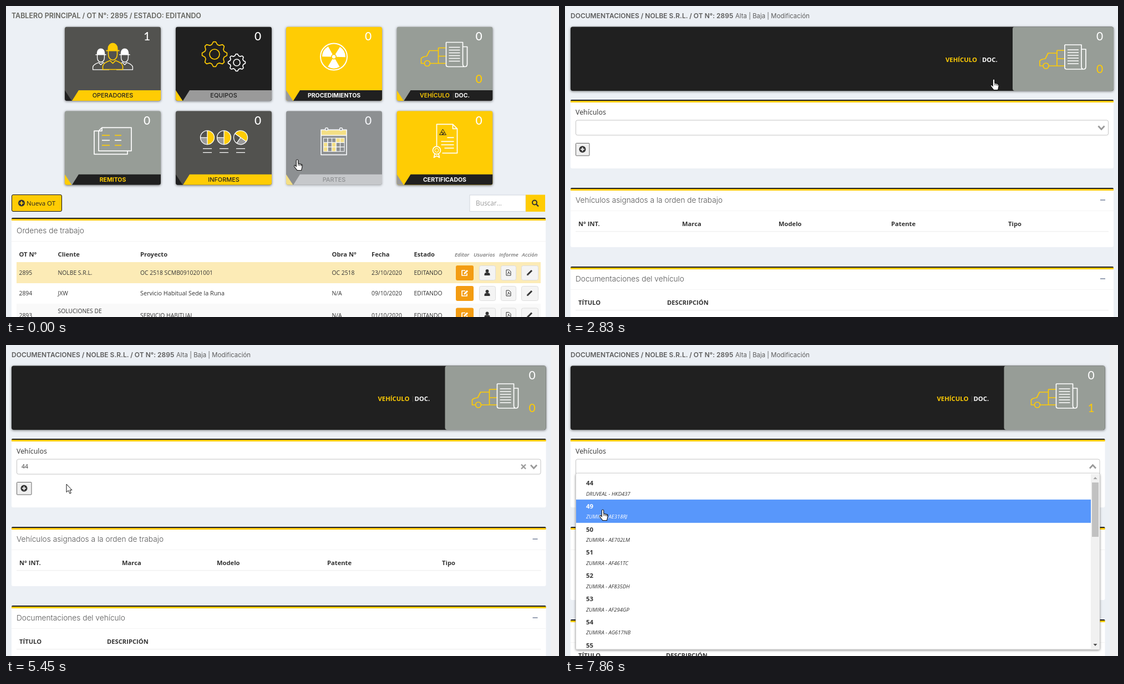
Animation of 997x561 px, one loop 7.99 s. Source, as an HTML page:

```html
<!DOCTYPE html>
<html lang="es">
<head>
<meta charset="utf-8">
<title>Tablero de órdenes</title>
<style>
  html, body { margin: 0; width: 100%; height: 100%; overflow: hidden; background: #ecf0f5; }
  svg { display: block; width: 997px; height: 561px; cursor: none; }
  text { font-family: "Open Sans", "Noto Sans", sans-serif; white-space: pre; }
  .head { font-family: Inter, sans-serif; }
  .count { font-family: Lato, sans-serif; text-anchor: middle; }
  .b { font-weight: 700; }
  .s { font-weight: 600; }
  .m { font-weight: 500; }
  .l { font-weight: 300; }
  .i { font-style: italic; }
  .c { text-anchor: middle; }
  .shadow { filter: drop-shadow(0 1px 2px #0008); }
  .line { fill: none; stroke-width: 1.7; stroke-linejoin: round; }
</style>
</head>
<body>
<svg viewBox="0 0 997 561">
  <defs><clipPath id="round"><rect width="173" height="133.5" rx="4"/></clipPath></defs>
  <g id="page"></g>
  <g id="select"></g>
  <g id="list"></g>
  <g id="cursor"></g>
</svg>
<script>
const LOOP = 7990;
const Y = '#ffcc04', K = '#202020', D = '#52524f', G = '#979d97', S = '#9a9a9a', W = '#fff', INK = '#333';
const $ = id => document.getElementById(id);

const rect = (x, y, w, h, fill, more = '') => `<rect x="${x}" y="${y}" width="${w}" height="${h}" fill="${fill}" ${more}/>`;
const text = (x, y, str, size, fill = INK, cls = '') => `<text x="${x}" y="${y}" font-size="${size}" fill="${fill}" class="${cls}">${str}</text>`;
const line = (d, stroke, more = '') => `<path class="line" d="${d}" stroke="${stroke}" ${more}/>`;
const fill = (d, color) => `<path d="${d}" fill="${color}"/>`;
const disc = (x, y, r, color, more = '') => `<circle cx="${x}" cy="${y}" r="${r}" fill="${color}" ${more}/>`;
const at = (x, y, body, more = '') => `<g transform="translate(${x} ${y}) ${more}">${body}</g>`;
const range = (n, f) => Array.from({ length: n }, (_, i) => f(i)).join('');

// ---- icons, placed relative to their tile ----
function person(x, y, scale, color) {
  const hollow = `style="fill:${D}"`;
  return at(x, y, line('M-18 48V42Q-17 36 -5 32L0 37L5 32Q17 36 18 42V48Z', color, hollow) +
    line('M-8 13V21A8 10 0 0 0 8 21V13', color, hollow) +
    fill('M-12 15V13H-9V10A9 10 0 0 1 9 10V13H12V15Z', color), `scale(${scale})`);
}
function gear(x, y, r, hole, color) {
  const pts = range(32, i => {
    const a = (i - .5) * Math.PI / 16, q = i % 4 < 2 ? r : r * .8;
    return `${i ? 'L' : 'M'}${(q * Math.cos(a)).toFixed(1)} ${(q * Math.sin(a)).toFixed(1)}`;
  });
  return at(x, y, line(pts + 'Z', color) + disc(0, 0, hole, 'none', `stroke="${color}" stroke-width="1.7"`));
}
function trefoil(x, y, scale, color) {
  return at(x, y, `<circle r="13" fill="none" stroke="${color}" stroke-width="16" stroke-dasharray="13.614" transform="rotate(60)"/>` +
    disc(0, 0, 3.2, color), `scale(${scale})`);
}
function pie(x, turn) {
  return at(x, 48, fill('M0 -12.5A12.5 12.5 0 0 1 0 12.5Z', Y) + fill('M0 0H-12.5A12.5 12.5 0 0 0 0 12.5Z', S) +
    line('M0 -12.5V12.5M0 0H-12.5', W, 'style="stroke-width:1.3"') +
    disc(0, 0, 12.5, 'none', `stroke="${W}" stroke-width="1.3"`), `rotate(${turn})`) +
    line(`M${x - 8} 68h16m-16 7h16`, W, 'style="stroke-width:1.2"');
}
const icons = {
  crew: person(65, 39, .8, W) + person(108, 39, .8, W) + person(86.5, 29, 1, Y),
  gears: gear(70, 49.5, 22.5, 9, Y) + gear(110, 64.5, 15.5, 6, W),
  atom: disc(86, 54, 24, 'none', `stroke="${W}" stroke-width="2"`) + trefoil(86, 54, 1, W),
  truck: line('M50 66H44V57Q46 54 54 53L59 43H75V66H60M75 38H89M75 53H89M75 66H89M75 38V45', Y) +
    disc(55, 66, 5, G, `stroke="${Y}" stroke-width="1.7"`) +
    line('M89 28H119V67Q119 72 123 72Q127 72 127 67V36H119M89 28V69Q89 72 93 72H123', W, `style="fill:${G}"`) +
    line(range(6, i => `M94 ${37 + 5 * i}h20`), W),
  sheets: line('M61 36H53V78H113V72M67 30H120V72H61V36ZM67 30V36H61', W) +
    range(3, i => line(`M67 ${44 + 9 * i}h14`, i % 2 ? W : Y) + line(`M90 ${44 + 9 * i}h12`, i % 2 ? W : Y)),
  pies: pie(57, 0) + pie(87, 0) + pie(117, -55),
  calendar: rect(63, 34, 46, 10, Y) + line('M63 34H109V79H63ZM63 44H109', W) +
    [73, 99].map(x => disc(x, 33, 2.5, K, `stroke="${W}" stroke-width="1.5"`)).join('') +
    range(15, i => rect(67.5 + i % 5 * 7.5, 49 + Math.floor(i / 5) * 8, 7.5, 8, [3, 4, 5, 7, 10, 12].includes(i) ? Y : 'none', `stroke="${W}" stroke-width="1.1"`)),
  award: line('M72 66V24H101L109 32V76H82M101 24V32H109M91 48h12M80 55h23M80 61h23M86 67h17', W) +
    line('M83 33L89 43H77Z', K, 'style="stroke-width:1"') + trefoil(83, 40, .13, K) +
    line('M69 76L67 84L72 81L77 84L75 76', W) + disc(72, 71, 7, Y, `stroke="${W}" stroke-width="1.7"`) +
    disc(72, 71, 3.5, 'none', `stroke="${W}"`)
};

const plus = (x, y, color, sign = 'M-3.5 0H3.5M0 -3.5V3.5') => at(x, y, disc(0, 0, 6, INK) + line(sign, color, 'style="stroke-width:2"'));

// ---- dashboard ----
const COLS = [106, 306, 505, 704.5], ROWS = [37.5, 189.3];
const TILES = [
  [D, K, Y, K, 'OPERADORES', 'crew'], [K, Y, S, K, 'EQUIPOS', 'gears'],
  [Y, S, K, W, 'PROCEDIMIENTOS', 'atom'], [G, Y, K, Y, '', 'truck'],
  [G, Y, K, Y, 'REMITOS', 'sheets'], [D, K, Y, K, 'INFORMES', 'pies'],
  [K, Y, S, K, 'PARTES', 'calendar'], [Y, S, K, W, 'CERTIFICADOS', 'award']
];

function tile([bg, corner, bar, ink, label, icon], i) {
  const bold = bar === K;
  const caption = label
    ? text(86.5, 127.7, label, bold ? 10.5 : 10.9, ink, 'head c ' + (bold ? 'b' : 'm'))
    : text(41.5, 127.7, 'VEHÍCULO', 10.5, Y, 'head s') + text(99, 127.2, '|', 10, D) + text(104.5, 127.7, 'DOC.', 10.5, W, 'head b') + text(148, 101.5, 0, 21, Y, 'count m');
  return at(COLS[i % 4], ROWS[i >> 2], `<g id="tile${i}"><g class="shadow"><g clip-path="url(#round)">` +
    rect(0, 0, 173, 134, bg) + fill('M0 114.5L12.5 133.5H0Z', corner) + fill('M25 114.5H173V133.5H13Z', bar) + '</g></g>' +
    icons[icon] + caption + text(148, 24.5, i ? 0 : 1, 21, W, 'count m') + '</g>');
}

const panel = (y, h, r) => rect(10, y, r - 10, h, W, 'rx="3"') + rect(10, y, r - 10, 4, K, 'rx="2"') + rect(10, y + 2, r - 10, 3, Y);
const track = rect(982, 0, 15, 561, '#f0f0f1');

function actions(y) {
  const box = (x, w) => rect(x + .5, y + .5, w, 26, '#f4f4f4', 'rx="3" stroke="#ddd"');
  const cy = y + 13;
  return rect(811, y, 32, 27, '#f39c12', 'rx="3"') + box(853, 29) + box(892, 27) + box(929, 30) +
    at(827, cy, line('M1 -4H-5V5H4V1', W) + line('M-1 2L5 -4', W, 'style="stroke-width:3"')) +
    at(867.5, cy, disc(0, -3, 2.9, INK) + fill('M-5 5V3Q-5 0 -2 0H2Q5 0 5 3V5Z', INK)) +
    at(906, cy, line('M-4 -5H1L4 -2V5H-4ZM-2 3Q1 0 0 -2Q0 1 3 2', INK, 'style="stroke-width:1"')) +
    at(944, cy, line('M-3 3L4 -4', INK, 'style="stroke-width:3"') + fill('M-5 5L-4.5 1.5L-1.5 4.5Z', INK));
}

function order(y, id, client, project, work, date, top = y) {
  const cell = (x, s) => text(x, y, s, /[a-z]/.test(s) ? 10.8 : 10.35);
  return cell(23.5, id) + text(93.5, top, client, 10.35) + cell(242, project) + cell(587.5, work) + cell(659, date) + cell(735.5, 'EDITANDO') + actions(y - 17);
}

function dashboard() {
  return track + text(10, 21.5, 'TABLERO PRINCIPAL / OT N°: 2895 / ESTADO: EDITANDO', 12.45, '#62625c', 'head s') +
    TILES.map(tile).join('') +
    rect(10.5, 340.5, 90, 30, Y, 'rx="2.5" stroke="#111"') + plus(28, 355.5, Y) + text(37, 360, 'Nueva OT', 11.5, '#222') +
    rect(836, 341, 101, 29.5, W, 'stroke="#d2d6de"') + text(847, 360, 'Buscar...', 11.8, '#999') +
    rect(937, 340.5, 35, 30.5, Y) + disc(953, 354.5, 4, 'none', 'stroke="#333" stroke-width="2"') + line('M956 357.5L960 361.5', INK, 'style="stroke-width:2.4"') +
    panel(382, 200, 973) + text(19, 410, 'Ordenes de trabajo', 13.7, '#555', 'head l') + rect(10, 424, 963, 1, '#f4f4f4') +
    [[23.5, 'OT N°'], [93.5, 'Cliente'], [242, 'Proyecto'], [587.5, 'Obra N°'], [659, 'Fecha'], [735.5, 'Estado']].map(([x, s]) => text(x, 452, s, 11.2, INK, 'b')).join('') +
    [[809, 'Editar'], [843, 'Usuarios'], [889, 'Informe'], [930, 'Acción']].map(([x, s]) => text(x, 452, s, 9.6, '#777', 's i')).join('') +
    rect(19, 462, 945, 38, '#fcebb6') + rect(19, 537, 945, 30, '#f9f9f9') +
    order(485, '2895', 'NOLBE S.R.L.', 'OC 2518 SCMB0910201001', 'OC 2518', '23/10/2020') +
    order(522, '2894', 'JXW', 'Servicio Habitual Sede la Runa', 'N/A', '09/10/2020') +
    order(561.5, '2893', 'SOLUCIONES DE', 'SERVICIO HABITUAL', 'N/A', '01/10/2020', 553.5);
}

// ---- vehicle documents ----
function documents(wide, added) {
  const r = wide ? 989 : 973.5, low = added ? 495 : 470;
  const xs = wide ? [24, 211, 385, 588, 799] : added ? [24, 179, 368, 550, 725] : [24, 209, 380, 579, 786];
  const section = (y, h, title, heads) => panel(y, h, r) + text(19, y + 26.5, title, 13.7, '#555', 'head l') +
    rect(r - 24, y + 21, 9, 2, '#97a0b3') + rect(10, y + 41, r - 10, 1, '#f4f4f4') +
    heads.map(([x, s]) => text(x, y + 68.5, s, 11.2, INK, 'b')).join('') + rect(19, y + 78, r - 28, 1.5, '#f1f1f1');
  const row = added ? rect(19, 407, 945, 26, '#f9f9f9') +
    ['44', 'DRUVEAL', 'MERLUNE', 'HKD437', 'FURGON'].map((s, i) => text(xs[i], 424, s, 10.35)).join('') + plus(905, 419.5, W, 'M-3.5 0H3.5') : '';
  return (wide ? '' : track) +
    text(10, 21.5, 'DOCUMENTACIONES / NOLBE S.R.L. / OT N°: 2895', 12, '#5c5c5c', 'head s') + text(307, 21.5, 'Alta | Baja | Modificación', 11.4, '#5c5c5c', 'head') +
    `<g class="shadow">${rect(10, 37.5, r - 10, 115.5, K, 'rx="4"')}</g>` + rect(r - 182, 37.5, 182, 115.5, G, 'rx="4"') +
    text(r - 303, 100.5, 'VEHÍCULO', 11.3, Y, 'b') + text(r - 243, 100, '|', 10, D) + text(r - 237, 100.5, 'DOC.', 11.3, W, 'b') +
    at(r - 177, 42, icons.truck) + text(r - 25, 62, 0, 21, W, 'count') + text(r - 25, 121, added ? 1 : 0, 21, Y, 'count') +
    panel(169, 124, r) + text(19, 195.5, 'Vehículos', 12.4, INK, 'm') +
    rect(19.5, 247.5, wide ? 24.5 : 26.5, 22.5, '#efefef', 'stroke="#666" rx="1"') + plus(wide ? 31.5 : 32.5, 258.5, '#efefef') +
    section(328, added ? 132 : 107, 'Vehículos asignados a la orden de trabajo', ['N° INT.', 'Marca', 'Modelo', 'Patente', 'Tipo'].map((s, i) => [xs[i], s])) + row +
    section(low, 150, 'Documentaciones del vehículo', [[24, 'TÍTULO'], [wide ? 184 : 182, 'DESCRIPCIÓN']]);
}

function selectBox(wide, picked, caret, turn) {
  const r = wide ? 989 : 973.5;
  return rect(19.5, 206, r - 29, 27, W, 'rx="3" stroke="#c4c4c4"') +
    (picked ? text(28, 223, '44', 10.35) + at(r - 40.5, 219.5, line('M-4 -4L4 4M4 -4L-4 4', S, 'style="stroke-width:2.4"')) : '') +
    (caret ? rect(28, 211, 1.2, 17, '#222') : '') +
    at(r - 22, 219.5, line('M-5.5 -3L0 3L5.5 -3', S, 'style="stroke-width:2.8;stroke-linejoin:miter"'), `rotate(${turn})`);
}

const CARS = ['DRUVEAL - HKD437', 'ZUMIRA - AE318RJ', 'ZUMIRA - AE702LM', 'ZUMIRA - AF461TC', 'ZUMIRA - AF835DH', 'ZUMIRA - AF294GP', 'ZUMIRA - AG617NB', ''];
function options(active) {
  return `<g class="shadow">${rect(19.5, 232, 944.5, 317.5, W, 'rx="2"')}</g>` +
    line('M19.5 232V549H964V232', '#ccc', 'style="stroke-width:1"') +
    CARS.map((car, i) => {
      const y = 237 + 41.8 * i, ink = i === active ? W : INK;
      return (i === active ? rect(20, y, 928, 42, '#5897fb') : '') +
        text(38, y + 16, i ? 48 + i : 44, 11.4, ink, 'b') + text(38, y + 34.5, car, 9.5, ink, 'i');
    }).join('') +
    rect(948, 233, 15.5, 316, '#f1f1f1') + rect(950, 248, 12, 98, '#c1c1c1') +
    fill('M952.5 242H959.5L956 238Z', '#a3a3a3') + fill('M952.5 539H959.5L956 543Z', '#505050');
}

// ---- pointer ----
const POINTERS = {
  hand: '<path d="M-1.7 2Q-1.7 0 0 0T1.7 2V7L7.5 8.5Q9.5 9 9.2 12L7.5 19.5H0L-5 13Q-6 10.5 -4.2 10.2L-1.7 12.5Z" fill="#fff" stroke="#111" stroke-width="1.1"/><path d="M2 8V11M4.7 8.5V11.5M7.3 9V12" stroke="#111"/>',
  arrow: '<path d="M0 0V14.5L3.5 11.4L6 17L8.3 16L6 10.7H10Z" fill="#fff" stroke="#111"/>',
  beam: '<path d="M-3.5 -8H-1.5Q0 -8 0 -6.5T1.5 -8H3.5M0 -6.5V6.5M-3.5 8H-1.5Q0 8 0 6.5T1.5 8H3.5" fill="none" stroke="#111" stroke-width="1.3"/>'
};
// time, x, y
const PATH = [
  [0, 525, 277], [50, 525, 277], [740, 741, 162], [880, 741, 162], [1650, 773, 132], [2830, 773, 132],
  [3600, 394, 212], [3860, 379, 218], [4500, 379, 218], [4880, 112, 257], [5130, 112, 257], [5450, 109, 251],
  [5830, 33, 256], [6210, 33, 256], [6530, 58, 238], [6840, 75, 222], [7200, 75, 222], [7810, 67, 296], [7860, 68, 297], [LOOP, 68, 297]
];
const ramp = (t, from, ms) => Math.max(0, Math.min(1, (t - from) / ms));

function pointerAt(t) {
  const i = PATH.findIndex(p => p[0] > t), [t0, x0, y0] = PATH[i - 1], [t1, x1, y1] = PATH[i];
  const p = (t - t0) / (t1 - t0), e = p * p * (3 - 2 * p);
  return [x0 + (x1 - x0) * e, y0 + (y1 - y0) * e];
}
function pointerKind(t, x, y, open) {
  const inside = (left, top, w, h) => x >= left && x <= left + w && y >= top && y <= top + h;
  if (t < 2830) return COLS.some(c => ROWS.some(r => inside(c, r, 173, 133))) ? 'hand' : 'arrow';
  if (t < 2900 || inside(19, 247, 27, 24) || open && y > 236) return 'hand';
  return inside(19, 206, 945, 27) ? 'beam' : 'arrow';
}

const shown = {};
function show(id, key, make) {
  if (shown[id] === key) return;
  shown[id] = key;
  $(id).innerHTML = make();
}

function frame() {
  const t = performance.now() % LOOP, home = t < 2830, wide = t < 2970, added = t >= 6210;
  const [x, y] = pointerAt(t);
  const open = t < 6000 ? ramp(t, 4105, 145) * (1 - ramp(t, 5130, 150)) : ramp(t, 7060, 150);

  show('page', home ? 'home' : `${wide}${added}`, () => home ? dashboard() : documents(wide, added));
  if (home) {
    $('tile6').setAttribute('opacity', .46 + .54 * ramp(t, 330, 150));
    $('tile3').setAttribute('opacity', 1 - .56 * ramp(t, 570, 150));
  }
  const picked = t >= 5130 && t < 6210, caret = t >= 4040 && t < 4600 || t >= 7040 && t < 7540;
  const turn = Math.round(-180 * open * open);
  show('select', home ? '' : [wide, picked, caret, turn].join(), () => home ? '' : selectBox(wide, picked, caret, turn));

  const active = t > 7000 && y > 279 ? 1 : 0;
  show('list', open ? `o${active}` : '', () => open ? options(active) : '');
  $('list').setAttribute('opacity', open);

  const kind = pointerKind(t, x, y, open > 0);
  show('cursor', kind, () => POINTERS[kind]);
  $('cursor').setAttribute('transform', `translate(${x.toFixed(1)} ${y.toFixed(1)})`);
  requestAnimationFrame(frame);
}
frame();
</script>
</body>
</html>
```
